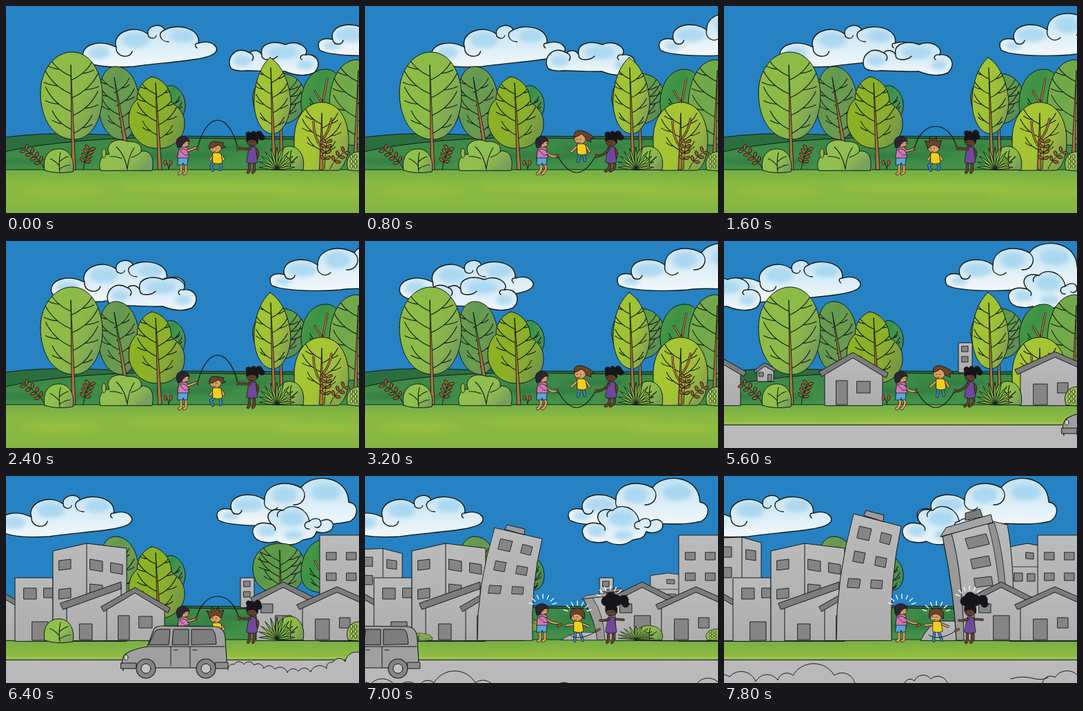
An HTML page for the animation above (8000 ms loop, 512 by 301 pixels).

```html
<!DOCTYPE html>
<html lang="en">
<head>
<meta charset="utf-8">
<title>Skipping rope</title>
<style>
html, body { margin: 0; width: 100%; height: 100%; overflow: hidden; background: #2682c2; }
svg { display: block; width: 100%; height: 100%; }
</style>
</head>
<body>
<svg id="stage" viewBox="0 0 512 301" preserveAspectRatio="none" stroke-linecap="round" stroke-linejoin="round"></svg>
<script>
const INK = '#15181a', WALL = '#b5b5b5', ROOF = '#7c7c7c', PANE = '#858585', ROAD = '#b9b9b9';
const LOOP = 8000, STEP = 200, BASE = 238;

const path = (d, fill = 'none', w = 1, ink = INK) =>
  `<path d="${d}" fill="${fill}" stroke="${ink}" stroke-width="${w}"/>`;
const oval = (x, y, rx, ry, fill, w = 0.8, ink = INK) =>
  `<ellipse cx="${x}" cy="${y}" rx="${rx}" ry="${ry}" fill="${fill}" stroke="${ink}" stroke-width="${w}"/>`;
const blot = (x, y, rx, ry, fill, alpha) =>
  `<ellipse cx="${x}" cy="${y}" rx="${rx}" ry="${ry}" fill="${fill}" opacity="${alpha}" filter="url(#soft)"/>`;
const group = (id, body) => `<g id="${id}">${body}</g>`;
const limb = (d, color, w = 3) => path(d, 'none', w + 1.2) + path(d, 'none', w, color);
const shaded = (d, fill, tone = 'leaf') => path(d, fill, 0) + path(d, `url(#${tone})`);

// ---- plants
function veins(x0, y0, x1, y1, w, n) {
  let d = '';
  for (let i = 0; i < n; i++) {
    const k = i / (n - 1), x = x0 + (x1 - x0) * k, y = y0 + (y1 - y0) * k + 12;
    const s = w * (0.6 + 0.4 * Math.sin(Math.PI * (0.2 + 0.7 * k)));
    d += `M${x} ${y}q${-s * .7} ${-s * .3} ${-s} ${-s * .95}M${x} ${y + 6}q${s * .7} ${-s * .3} ${s} ${-s * .95}`;
    d += `M${x - s * .5} ${y - s * .3}q${-s * .3} -1 ${-s * .5} -5M${x + s * .5} ${y + 6 - s * .3}q${s * .3} -1 ${s * .5} -5`;
  }
  return path(d, 'none', 1.1);
}
function tree(id, crown, color, [x0, y0, x1, y1], bottom, w, n = 4, fork = '') {
  const k = (bottom - y0) / (y1 - y0);
  return group(id, `<clipPath id="${id}Clip"><path d="${crown}"/></clipPath>` + shaded(crown, color) +
    `<g clip-path="url(#${id}Clip)">${veins(x0, y0, x0 + (x1 - x0) * k, bottom, w, n)}</g>` +
    (fork && limb(fork, '#a9763f', 2)) +
    path(`M${x0} ${y0 - 4}L${x1 - 2.6} ${y1}h5.2Z`, '#a9763f', 0.9));
}
function sprig(x, y, dx, dy, n) {
  let s = path(`M${x} ${y}Q${x + dx * .3} ${y + dy * .6} ${x + dx} ${y + dy}`, 'none', 1);
  const tilt = Math.atan2(dx, -dy) * 180 / Math.PI;
  for (let i = 1; i <= n; i++) {
    const k = (i + 0.4) / (n + 0.4), cx = x + dx * (0.6 * k * (1 - k) + k * k), cy = y + dy * (1.2 * k * (1 - k) + k * k);
    for (const side of [-1, 1])
      s += `<g transform="translate(${cx} ${cy}) rotate(${tilt + side * 58})">${oval(0, -5, 2, 4, '#a9602f', 0.9)}</g>`;
  }
  return s;
}
function agave(x, y) {
  let s = '';
  for (let i = 0; i < 11; i++) {
    const a = Math.PI * (0.04 + 0.92 * i / 10), r = 25 + 8 * Math.sin(a);
    const px = x - r * Math.cos(a), py = y - r * Math.sin(a), mx = (x + px) / 2, my = (y + py) / 2;
    const nx = 3.2 * Math.sin(a), ny = 3.2 * Math.cos(a);
    s += path(`M${x} ${y}Q${mx - nx} ${my + ny - 2} ${px} ${py}Q${mx + nx} ${my - ny - 2} ${x} ${y}Z`, '#7db844', 0.9);
  }
  return s;
}

// ---- buildings
const pane = (x, y, w, h, dy = 0, dx = 0, fill = PANE) =>
  path(`M${x} ${y}l${w} ${dy}l${dx} ${h}l${-w} ${-dy}Z`, fill, 0.9);
const wall = d => shaded(d, WALL, 'dusk');
function house(x0, xm, x1, top, eave) {
  return wall(`M${x0 + 8} ${BASE + 1}V${eave - 1}L${xm} ${top + 6}L${x1 - 8} ${eave}V${BASE + 1}Z`) +
    path(`M${x0} ${eave - 2}L${xm} ${top}L${x1} ${eave}l-3 7L${xm} ${top + 8}L${x0 + 4} ${eave + 5}Z`, ROOF);
}

// ---- clouds
function cloud(id, d, curls, blots) {
  return group(id, path(d, 'url(#fluff)', 0) + blots.map(b => blot(...b, '#9fd2ee', 0.75)).join('') +
    path(d + curls, 'none', 1.4));
}
const clouds =
  cloud('cloudA', 'M112 74C108 57 135 47 160 60C152 41 184 24 206 41C203 27 228 24 230 35C246 25 283 31 279 54C300 48 312 62 302 69C290 80 222 82 186 88C150 90 116 88 112 74Z',
    'M160 60C158 74 180 78 183 66M206 41C206 48 217 49 218 43M230 35C219 38 223 52 236 52M279 54C273 54 274 59 277 61',
    [[188, 50, 20, 11], [135, 68, 16, 9], [256, 44, 18, 9]]) +
  cloud('cloudB', 'M326 90C318 75 335 56 353 68C360 62 368 65 371 71C367 53 390 50 405 56C425 48 442 63 434 71C452 68 459 86 447 97C432 104 414 99 404 95C392 96 366 94 350 94C338 95 330 94 326 90Z',
    'M371 71C370 81 388 79 394 73M353 68C359 70 360 76 357 79M434 71C428 70 425 75 429 78',
    [[402, 68, 22, 9], [343, 80, 13, 8], [434, 86, 12, 7]]) +
  cloud('cloudC', 'M2 64C-5 50 8 45 21 49C14 28 49 20 69 35C69 13 96 4 122 17C137 -5 190 -2 191 38C206 40 206 58 193 66C160 74 130 66 102 71C64 74 14 72 2 64Z',
    'M21 49C23 58 34 57 36 50M69 35C66 47 80 54 88 46M122 17C132 26 127 42 111 42',
    [[46, 42, 22, 10], [98, 28, 18, 12], [158, 24, 22, 12], [20, 58, 12, 6]]) +
  cloud('cloudD', 'M3 88C-4 76 6 64 28 70C17 57 26 45 45 50C56 38 80 46 83 66C89 60 98 61 99 66C111 59 121 67 116 77C109 84 98 83 93 81C90 95 76 90 72 94C59 104 43 99 36 95C24 99 7 96 3 88Z',
    'M28 70C32 72 35 76 33 79M45 50C40 49 35 54 37 59M83 66C74 66 74 78 83 77M99 66C102 72 96 77 91 74',
    [[58, 62, 18, 11], [22, 80, 13, 8], [60, 86, 14, 7]]);

// ---- scenery
const land =
  path('M-2 191Q50 184 110 186T250 189T400 190T514 190V240H-2Z', '#2c6f3f') +
  path('M-2 212Q40 202 110 196T270 192T514 194V240H-2Z', 'url(#hill)') +
  [[60, 226, 70, 5], [250, 218, 80, 5], [330, 206, 50, 4]].map(b => blot(...b, '#256b3c', 0.5)).join('') +
  path(`M-2 ${BASE}H514V303H-2Z`, 'url(#grass)', 0.9) +
  [[80, 270, 60, 7], [300, 264, 130, 7], [450, 272, 70, 7]].map(b => blot(...b, '#a3c43e', 0.45)).join('');

const backTrees =
  tree('tree2', 'M134 140C134 106 144 88 159 88C181 88 194 115 193 145C192 176 180 196 165 194C146 191 134 170 134 140Z', '#619850', [157, 108, 174, 205], 165, 26) +
  tree('tree4', 'M222 140C224 120 236 111 246 118C263 128 264 155 252 164C238 170 222 165 222 140Z', '#35904c', [237, 128, 238, 170], 150, 18, 3) +
  tree('tree5', 'M358 136C357 112 375 98 398 98C420 98 435 114 434 136C432 158 418 172 398 171C373 170 359 157 358 136Z', '#589849', [397, 112, 400, 238], 146, 32) +
  tree('tree6', 'M428 138C430 110 444 92 464 92C482 92 489 112 488 136C487 162 470 172 452 169C434 166 427 156 428 138Z', '#3b9246', [459, 140, 457, 200], 152, 22, 2, 'M459 142L448 124M459 142L466 106') +
  tree('tree8', 'M469 150C468 108 484 80 508 78C530 80 540 120 536 160C526 206 500 210 484 194C474 186 469 170 469 150Z', '#6fa84a', [511, 98, 506, 238], 176, 36);

const frontTrees =
  tree('tree1', 'M50 126C50 92 72 66 97 67C124 68 140 98 140 132C139 168 122 196 96 194C68 192 50 164 50 126Z', '#8abb48', [94, 90, 98, 238], 168, 40) +
  tree('tree3', 'M211 103C200 108 190 118 190 136C178 146 176 164 180 178C190 202 206 208 224 207C244 206 260 190 259 170C259 154 248 146 240 140C240 118 224 104 211 103Z', '#89b024', [217, 116, 223, 238], 176, 30) +
  tree('tree9', 'M383 75C366 90 359 118 360 146C363 172 374 186 388 186C402 184 413 162 413 138C410 106 398 84 383 75Z', '#9fc334', [384, 94, 389, 238], 160, 24) +
  tree('tree7', 'M418 196C417 162 436 139 460 140C486 142 498 170 497 200C496 222 490 234 482 239H428C420 232 418 214 418 196Z', '#a5c532', [458, 160, 457, 238], 198, 28, 3, 'M457 205Q446 190 446 168M457 196Q470 182 472 164');

const plants =
  group('sprigL', sprig(56, 237, -27, -27, 4) + sprig(112, 238, 9, -29, 4)) +
  group('sprigR', sprig(462, 237, 3, -38, 4) + sprig(470, 237, 20, -24, 3)) +
  group('bushB', shaded('M137 239C132 224 142 214 150 216C142 200 160 190 176 197C190 196 198 202 196 211C210 209 216 222 212 239Z', '#8fbf50') +
    path('M176 238Q172 215 160 205M176 236Q178 218 186 206M168 222Q158 218 151 219M182 220Q192 217 197 211', 'none', 1.1) +
    oval(142, 214, 3, 7, '#9ab54a', 0.8)) +
  group('twig', path('M236 238Q236 230 231 226M236 236L240 226') + oval(231, 228, 2, 4, '#b05a2c', 0.7) + oval(239, 228, 2, 4, '#b05a2c', 0.7)) +
  group('bushA', shaded('M56 239C52 218 64 206 80 208C94 210 100 226 97 241Q74 245 56 239Z', '#8ec04c') +
    path('M78 241Q76 226 79 213M77 232Q70 224 64 222M78 226Q85 220 90 219M77 237Q88 231 93 231', 'none', 1.1)) +
  group('bushC', shaded('M392 238C390 214 400 203 413 204C428 206 434 222 431 238Z', '#8abb48') + path('M413 237Q411 220 414 210M413 228L423 219M413 224L404 217', 'none', 1.1)) +
  group('agave', agave(393, 238)) +
  group('bushD', shaded('M496 238C491 222 500 212 512 212H516V240Z', '#92c04c') +
    [0, 1, 2, 3, 4, 5].map(i => oval(501 + i % 2 * 6, 219 + (i >> 1) * 7, 2, 3, '#b9d46a', 0.7)).join(''));

const farTown =
  group('apt', wall('M340 191V148H360V191Z') + [0, 1].map(i => pane(345, 153 + i * 15, 9, 8)).join('')) +
  group('hut', wall('M48 204V188L60 180L72 188V204Z') + path('M44 188L59 177L75 186L73 190L59 182L46 192Z', ROOF) + pane(51, 191, 6, 6) + pane(64, 194, 5, 10)) +
  group('blockE', wall('M-2 240V90L26 89L54 97V240Z') + path('M26 89V240') + pane(-2, 103, 13, 15) + pane(32, 107, 14, 14, 2) + pane(-2, 133, 13, 15)) +
  group('blockF', wall('M414 240V103L440 98L456 101V240Z') + path('M414 132H456', 'none', 0.8) + pane(438, 111, 11, 9, 1) + pane(421, 141, 12, 12) + pane(440, 142, 11, 11)) +
  group('blockD', wall('M455 240V86H514V240Z') + [0, 1].map(i => pane(465, 111 + i * 30, 14, 11) + pane(494, 111 + i * 30, 14, 11)).join('')) +
  group('houseL', house(-62, -14, 32, 164, 190)) +
  group('blockC', wall('M13 240V148H68V240Z') + pane(26, 163, 18, 16) + pane(55, 163, 13, 14) + pane(38, 212, 23, 27)) +
  group('blockB', wall('M68 240V109L117 98L175 105V240Z') + path('M117 98V240') +
    pane(77, 123, 17, 14, -2) + pane(122, 121, 18, 15, 3) + pane(152, 126, 17, 14, 3) +
    pane(77, 165, 17, 14, -2) + pane(122, 157, 18, 14, 2));

const nearTown =
  group('shed', wall('M88 239V188L167 160V239Z') + path('M79 185L167 154V164L83 194Z', ROOF) + pane(107, 215, 18, 23)) +
  group('houseM', house(138, 187, 238, 162, 192) + pane(163, 203, 16, 35) + pane(193, 204, 19, 17)) +
  group('towerA', wall('M163 239Q162 150 188 55L257 73Q240 150 243 239Z') + path('M203 57L206 50L232 57L231 66Z', '#9a9a9a') +
    pane(197, 73, 17, 17, 4, -4) + pane(229, 82, 14, 14, 4, -3) + pane(190, 109, 15, 15, 3, -3) +
    pane(221, 117, 15, 13, 3, -2) + pane(181, 149, 17, 13, 1, -2) + pane(214, 151, 16, 12, 1, -1)) +
  group('towerB', wall('M285 239Q298 214 314 211H345V239Z') +
    wall('M317 88L390 66L411 71Q422 130 420 239H337Q334 170 317 88Z') +
    path('M317 88L330 84Q346 140 348 239H337Q334 170 317 88Z', '#9a9a9a') +
    path('M383 70L392 68Q410 120 412 239H404Q402 140 383 70Z', '#929292', 0.8) +
    path('M314 88L322 75L387 56L390 67Z', '#a5a5a5') + path('M350 64V54L371 48L375 59Z', ROOF) +
    pane(350, 91, 30, 15, -7, 5) + pane(358, 121, 26, 14, -5, 3) + pane(363, 149, 25, 13, -3, 2)) +
  group('houseN', house(355, 402, 452, 154, 179) + pane(370, 186, 17, 13) + pane(391, 203, 23, 35)) +
  group('houseR', house(422, 480, 544, 161, 189) + pane(449, 208, 20, 30) + pane(484, 206, 15, 15));

// ---- children
const SKIN = '#dc9f63', DARK = '#69402c', BLACK = '#17141a';
const face = (x, y) => path(`M${x - 3} ${y}h1.5M${x + 2} ${y}h1.5M${x - 1} ${y + 4}q1.5 1.2 3 0`, 'none', 0.8);

function girl(ax, ay, bend, up = 0) {
  const k = bend ? 'q4 5 -2 12l-2 1' : 'v11l-3 2';
  return limb(`M254 ${231 - up}${k}`, SKIN) + limb(`M261 ${231 - up}${k}`, SKIN) +
    path(`M250 ${220 - up}h14l-1 11h-5l-1 -3l-1 3h-7Z`, '#5aa6dc', 0.8) +
    oval(257, 199 - up, 8.5, 8, SKIN) +
    path(`M249 ${206 - up}Q244 ${193 - up} 253 ${190 - up}Q264 ${188 - up} 266 ${197 - up}Q258 ${195 - up} 255 ${204 - up}Z`, '#2b2530') +
    face(261, 200 - up) +
    path(`M251 ${207 - up}Q258 ${203 - up} 264 ${207 - up}L265 ${221 - up}H249Z`, '#cf78b6', 0.8) +
    limb(`M262 ${211 - up}Q${(262 + ax) / 2} ${ay + 3 - up / 2} ${ax} ${ay}`, SKIN, 2.4) +
    path(`M252 ${209 - up}q5 -3 10 1l4 6l-6 1Z`, '#cf78b6', 0.8);
}
// Each bun is [x, y, radius].
function friend(ax, ay, bend, buns, wide) {
  const k = bend ? 'q5 5 -1 11l-3 2' : 'v12l-2 3';
  return limb(`M353 227${k}`, DARK) + limb(`M360 227${k}`, DARK) +
    limb(wide ? 'M361 208L375 209' : 'M362 208Q368 213 364 221', DARK, 2.4) +
    buns.map(([x, y, r]) => oval(x, y, r, r, BLACK, 1, BLACK)).join('') +
    oval(357, 196, 8, 8, DARK) + path('M349 196Q347 185 358 185Q368 187 365 200Q362 191 349 196Z', BLACK) + face(355, 198) +
    path('M353 205H362L365 227Q357 231 349 227Z', '#70489c', 0.8) +
    limb(`M354 208Q${(354 + ax) / 2} ${ay + 1} ${ax} ${ay}`, DARK, 2.4);
}
const SIDE = [[352, 187, 4], [359, 185, 3], [367, 187, 5], [371, 191, 4]];
const LIFT = [[352, 185, 3.5], [356, 186, 4], [365, 185, 4.5], [367, 190, 4]];
const PUFF = [[350, 182, 7], [357, 177, 8], [364, 181, 8], [375, 180, 7], [378, 186, 5]];
const HAIR = {
  flat: 'M295 207Q293 196 304 197L316 199L314 202L319 205L313 207Q311 203 308 202Q302 206 295 207Z',
  wind: 'M295 207Q291 195 304 195L314 194L313 197L320 199L316 202L320 207L312 207Q310 203 307 202Q301 206 295 207Z',
  fly: 'M296 204Q293 195 303 194Q315 195 325 205L319 206L320 211L313 208Q311 202 306 199Q301 203 296 204Z',
  up: 'M296 207L291 196L298 198L298 190L304 196L308 190L309 197L316 195L312 207Q308 202 303 202Q300 204 296 207Z',
  bob: 'M295 209Q292 194 305 194Q319 195 315 210L311 206Q304 199 298 205Z'
};
function jumper(hair, dx, dy, legs, arms) {
  return `<g transform="translate(${dx} ${dy})">` + limb(legs, '#3d82c4', 3) + limb(arms, SKIN, 2.4) +
    path('M300 214Q306 211 312 215L314 228Q306 231 300 228Z', '#f2cf1d', 0.8) +
    oval(304, 206, 8.5, 7.5, SKIN) + path(HAIR[hair], '#694527', 0.9) + face(302, 207) + '</g>';
}
const rope = (x0, x1, y, c, inset = 10) => path(`M${x0} ${y}C${x0 + inset} ${c} ${x1 - inset} ${c} ${x1} ${y}`, 'none', 1.2);
const grips = (x0, x1, y) => limb(`M${x0} ${y - 2}v4M${x1} ${y - 2}v4`, '#b0512c', 1.4);
const SQUAT = 'M302 228L297 232L300 239M309 227L312 232L311 238', HUG = 'M301 217L296 224M312 217L316 223L309 225';
const FLY = 'M303 229L301 239M309 229L311 238', OPEN = 'M300 217L291 225M313 217L318 225';
const rays = (x, y) => {
  let d = '';
  for (let i = 0; i < 7; i++) {
    const a = Math.PI * (0.1 + 0.8 * i / 6), c = Math.cos(a), s = Math.sin(a);
    d += `M${x - 15 * c} ${y - 12 * s}L${x - 21 * c} ${y - 18 * s}`;
  }
  return path(d, 'none', 1.3, '#fff');
};
const high = hair => rope(278, 336, 206, 152.7, 13) + girl(275, 206) + friend(338, 207, 0, SIDE) + grips(278, 336, 207) + jumper(hair, 0, 0, SQUAT, HUG);
const poses = {
  rest: high('flat'),
  gust: high('wind'),
  land: rope(276, 338, 208, 164) + girl(275, 208) + friend(339, 207, 0, LIFT) + grips(276, 338, 207) + jumper('up', 0, 0, SQUAT, HUG),
  jump: girl(278, 218, 1) + friend(336, 218, 1, SIDE) + jumper('fly', 8, -13, FLY, OPEN) + rope(280, 334, 219, 250, 18) + grips(279, 335, 218),
  shock: rays(258, 190) + rays(308, 200) + rays(356, 178) + girl(279, 214, 0, 4) + limb('M280 218l4 -2', '#c4492c', 2.4) +
    friend(341, 210, 0, PUFF, true) +
    jumper('bob', 3, -2, 'M302 230L301 242M309 230L313 241', 'M299 218L289 219M313 217L322 221') +
    path('M297 231C308 240 328 232 337 224') + limb('M336 225l4 -2', '#c4492c', 2.4)
};
const CYCLE = ['rest', 'jump', 'land', 'rest', 'jump', 'gust'];

// ---- traffic
const road = group('road', path('M-2 267.5H514V330H-2Z', ROAD, 1) + path('M0 264H512', 'none', 2, '#9cc45a'));
const wheel = x => oval(x, 280, 14, 14, '#858585', 1.1) + oval(x, 280, 7, 7, '#c2c2c2', 1);
const car = group('car',
  path('M3 283Q-1 268 5 260Q14 252 38 248L47 224Q49 218 60 218L138 219Q150 221 151 236L153 268V279H3Z', '#a0a0a0', 1.1) +
  path('M40 245L49 226Q51 223 57 223H71L69 245ZM74 245L76 223H98V245ZM102 245V223H131Q137 224 138 244Z', '#7d7d7d') +
  path('M38 248H150M72 248V276M100 248V278M76 253h6M104 253h6') +
  path('M0 272H22V280H0ZM137 271H155V280H137Z', '#8c8c8c') + oval(7, 264, 3, 4, '#c9c9c9') + wheel(36) + wheel(123));
const puffs = pts => 'M' + pts.map(([x, y], i) => {
  if (!i) return `${x} ${y}`;
  const r = Math.hypot(x - pts[i - 1][0], y - pts[i - 1][1]) * 0.58;
  return `A${r} ${r} 0 0 1 ${x} ${y}`;
}).join('');
const plume = puffs([[322, 282], [331, 274], [345, 274], [360, 275], [374, 280], [390, 281], [408, 286], [424, 284], [442, 285], [465, 280], [474, 271], [492, 270], [518, 259]]);
const trail = group('trail', path(plume + 'V330H322Z', ROAD, 0) + path(plume));
const dust = group('dust', path(puffs([[-14, 300], [8, 292], [46, 299], [78, 297], [100, 290], [160, 290], [190, 303]]), ROAD) +
  path(puffs([[262, 301], [276, 298], [300, 295], [325, 303]]), ROAD) + path('M416 295Q432 290 447 294T470 293' + puffs([[462, 301], [480, 293], [516, 294]])));

const grad = (id, stops, dir = 'x2="0" y2="1"') => `<linearGradient id="${id}" ${dir}>` +
  stops.map(([o, c, a = 1]) => `<stop offset="${o}" stop-color="${c}" stop-opacity="${a}"/>`).join('') + '</linearGradient>';
document.getElementById('stage').innerHTML = '<defs>' +
  grad('leaf', [[0, '#b4cc3c', 0.2], [0.45, '#b4cc3c', 0], [1, '#5b7a6c', 0.45]], 'x2="1" y2=".6"') +
  grad('dusk', [[0, '#fff', 0.08], [1, '#333', 0.06]]) +
  grad('fluff', [[0, '#c3e3f4'], [0.5, '#d9edf7'], [1, '#f3f8fa']]) +
  grad('hill', [[0, '#3c8746'], [1, '#43924a']]) +
  grad('grass', [[0, '#74ae45'], [0.3, '#8bba42'], [0.7, '#8ab942'], [1, '#80b344']]) +
  '<filter id="soft" x="-30%" y="-80%" width="160%" height="260%"><feGaussianBlur stdDeviation="3"/></filter></defs>' +
  '<path d="M0 0H512V301H0Z" fill="#2682c2"/>' + clouds + land + backTrees + farTown + frontTrees + nearTown + plants +
  Object.keys(poses).map(k => group(k, poses[k])).join('') + road + trail + car + dust;

// ---- motion
const $ = id => document.getElementById(id);
const move = (id, x, y = 0) => $(id).setAttribute('transform', `translate(${x} ${y})`);
const show = (id, on) => { $(id).style.display = on ? '' : 'none'; };
const clamp = v => Math.max(0, Math.min(1, v));
const ramp = (t, from, dur) => 1 - (1 - clamp((t - from) / dur)) ** 2;
const stretch = (id, s) => {
  show(id, s > 0.01);
  $(id).setAttribute('transform', `matrix(1 0 0 ${s} 0 ${BASE * (1 - s)})`);
};
function along(t, keys) {
  let i = 1;
  while (i < keys.length - 1 && t > keys[i][0]) i++;
  const [t0, a] = keys[i - 1], [t1, b] = keys[i];
  return a + (b - a) * (t - t0) / (t1 - t0);
}
const rise = { hut: 4900, houseM: 4900, apt: 5000, houseL: 5000, houseR: 5100, blockC: 5700, blockB: 5750, shed: 5800, houseN: 5800, blockD: 5800, towerA: 6700, blockE: 6700, blockF: 6800, towerB: 6900 };
const fall = { bushB: 4900, sprigR: 5000, twig: 5600, sprigL: 5600, tree1: 5700, tree9: 5700, tree7: 5700, tree8: 5750, tree5: 6800, tree6: 6800, tree3: 6800, bushA: 6800, bushC: 6900, agave: 6900, bushD: 6900 };

function draw(t) {
  move('cloudA', -0.0192 * t);
  move('cloudB', along(t, [[0, 0], [1600, -122], [3200, -232], [4600, -322], [5600, -400], [8000, -570]]));
  move('cloudC', along(t, [[0, 453], [1600, 400], [3200, 366], [4600, 340], [6400, 306], [7800, 280]]));
  move('cloudD', along(t, [[0, 806], [4600, 483], [5600, 412], [6400, 357], [7800, 258]]));

  for (const id in rise) stretch(id, ramp(t, rise[id], 450));
  for (const id in fall) stretch(id, 1 - ramp(t, fall[id], 450));

  const pose = t >= 7000 ? 'shock' : CYCLE[Math.floor(t / STEP) % CYCLE.length];
  for (const id in poses) show(id, id === pose);

  move('road', 0, 36 * (1 - ramp(t, 4900, 400)));
  show('road', t > 4900);
  const x = 490 - (t - 5600) * 0.40375;
  move('car', x);
  show('car', t > 5500 && x > -160);
  move('trail', Math.max(x - 167, 0), 60 * clamp((t - 6400) / 700));
  show('trail', t > 5600 && t < 7100);
  move('dust', 0, 24 * (1 - ramp(t, 6800, 600)));
  show('dust', t > 6800);
}
const start = performance.now();
let last = -1;
function tick() {
  const t = Math.floor((performance.now() - start) % LOOP / STEP) * STEP;
  if (t !== last) draw(last = t);
  requestAnimationFrame(tick);
}
tick();
</script>
</body>
</html>
```
